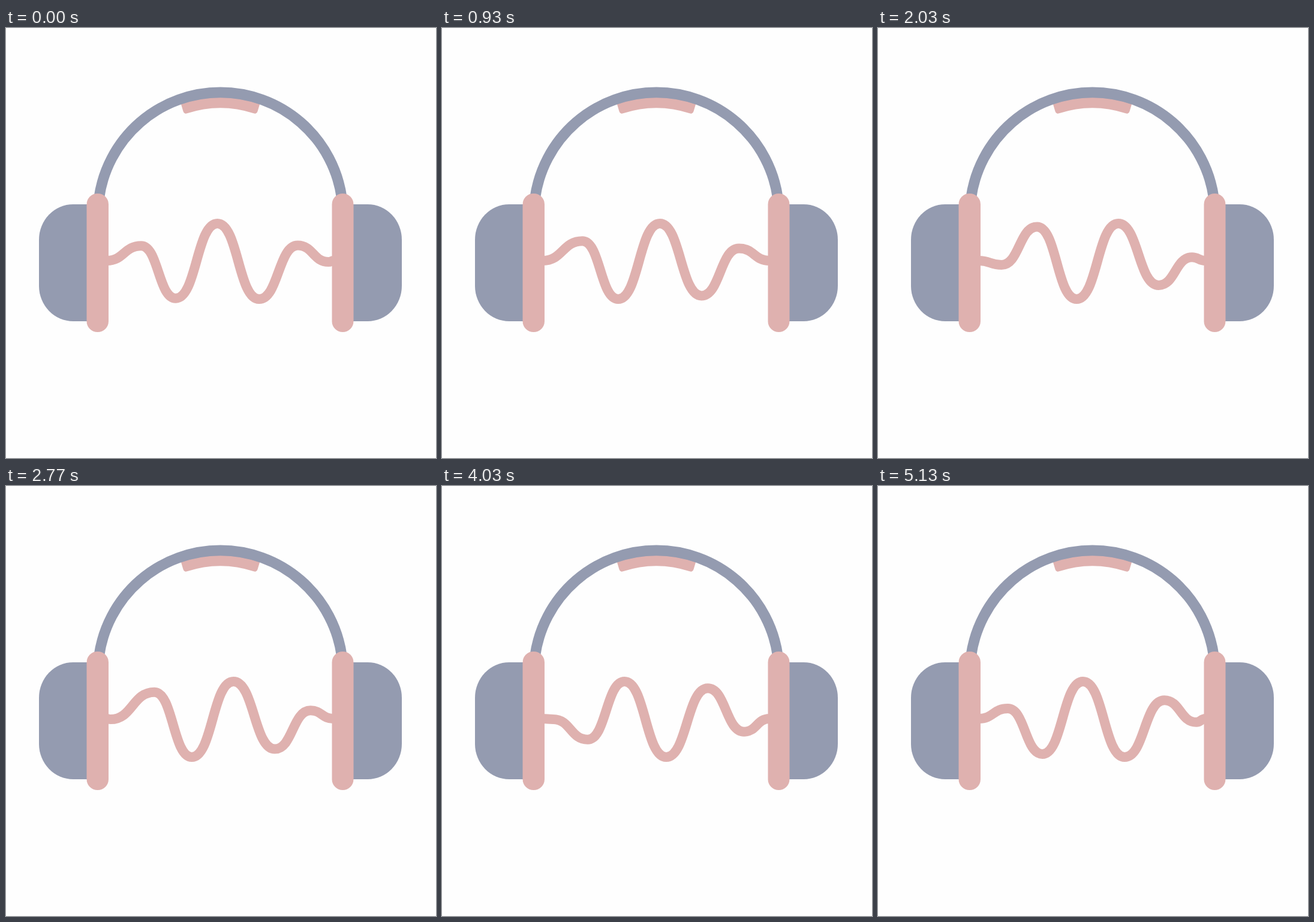
Write an HTML page that moves like this. It is 717 px wide and 717 px high and loops after 5160 ms.

```html
<!DOCTYPE html>
<html lang="en">
<head>
<meta charset="utf-8">
<title>Headphones</title>
<style>
  html, body { margin: 0; width: 100%; height: 100%; overflow: hidden; background: #fefefe; }
  svg { display: block; width: 100%; height: 100%; }
  .blue { fill: #949bb0; }
  .pink { fill: #dfb1af; }
  .band { fill: none; stroke: #949bb0; stroke-width: 17.6; }
  .wave { fill: none; stroke: #dfb1af; stroke-width: 16; stroke-linejoin: round; }
</style>
</head>
<body>
<svg viewBox="0 0 717 717">
  <path class="pink" d="M291 124L295.5 139Q297.5 144 302 142.3A178.5 178.5 0 0 1 413 142.3Q417.5 144 419.5 139L424 124A196 196 0 0 0 291 124Z"/>
  <path class="band" d="M155 284A204.4 204.4 0 0 1 560 284"/>
  <path class="blue" d="M136 294H112A57 59 0 0 0 55 353V430A57 59 0 0 0 112 489H136Z"/>
  <path class="blue" d="M578 294H603A57 59 0 0 1 660 353V430A57 59 0 0 1 603 489H578Z"/>
  <path class="wave" id="wave"/>
  <rect class="pink" x="134.5" y="276" width="36.5" height="231" rx="18"/>
  <rect class="pink" x="543.5" y="276" width="36" height="231" rx="18"/>
</svg>
<script>
const LOOP = 5160;
const CYCLE_STEPS = 26;
const LEFT = 168, RIGHT = 546, END_Y = 388;
const MIDDLE = 352.5, HALF_WAVE = 69.5;
const AMPLITUDE = 63, BASELINE = 389;
const wave = document.getElementById('wave');

const progress = (x, a, b) => Math.min(1, Math.max(0, (x - a) / (b - a)));
const smooth = u => u * u * (3 - 2 * u);
const hump = (x, a, b) => Math.sin(Math.PI * progress(x, a, b));

function envelope(s) {
  return smooth(progress(s, 163, 290)) * (1 - progress(s, 422, 565)) ** 1.2;
}

// Turning points bunch up near the bars; troughs leave the left bar later than crests.
function turnX(s, isCrest) {
  const release = isCrest ? 1 : progress(s, 165, 195);
  return s + 0.17 * Math.max(0, 283 - s) * release - 0.00135 * Math.max(0, s - 430) ** 2;
}

function turnY(s, isCrest) {
  const base = BASELINE - 4 * hump(s, 165, 290) + 2 * hump(s, 440, 565);
  return base + AMPLITUDE * envelope(s) * (isCrest ? -1 : 1);
}

function turningPoints(crest) {
  const points = [[LEFT, END_Y]];
  for (let n = -6; n <= 6; n++) {
    const s = crest + n * HALF_WAVE, isCrest = n % 2 === 0;
    const x = turnX(s, isCrest);
    if (s > 140 && s < 575 && x > LEFT + 2 && x < RIGHT - 2) points.push([x, turnY(s, isCrest)]);
  }
  points.push([RIGHT, END_Y]);
  return points;
}

// Joins points with curves that run level through each one.
function levelCurve(points) {
  let path = 'M' + points[0];
  for (let i = 1; i < points.length; i++) {
    const [x0, y0] = points[i - 1], [x1, y1] = points[i];
    const mid = (x0 + x1) / 2;
    path += `C${mid} ${y0} ${mid} ${y1} ${x1} ${y1}`;
  }
  return path;
}

// Thirty steps per second, on a clock that ticks in hundredths.
const stepAt = ms => Math.floor((Math.floor(ms / 10) + 0.5) * 0.3);

function draw(ms) {
  const cycle = stepAt(ms % LOOP) / CYCLE_STEPS % 1;
  wave.setAttribute('d', levelCurve(turningPoints(MIDDLE + 2 * HALF_WAVE * cycle)));
}

const start = performance.now();
function tick() {
  draw(performance.now() - start);
  requestAnimationFrame(tick);
}
tick();
</script>
</body>
</html>
```
